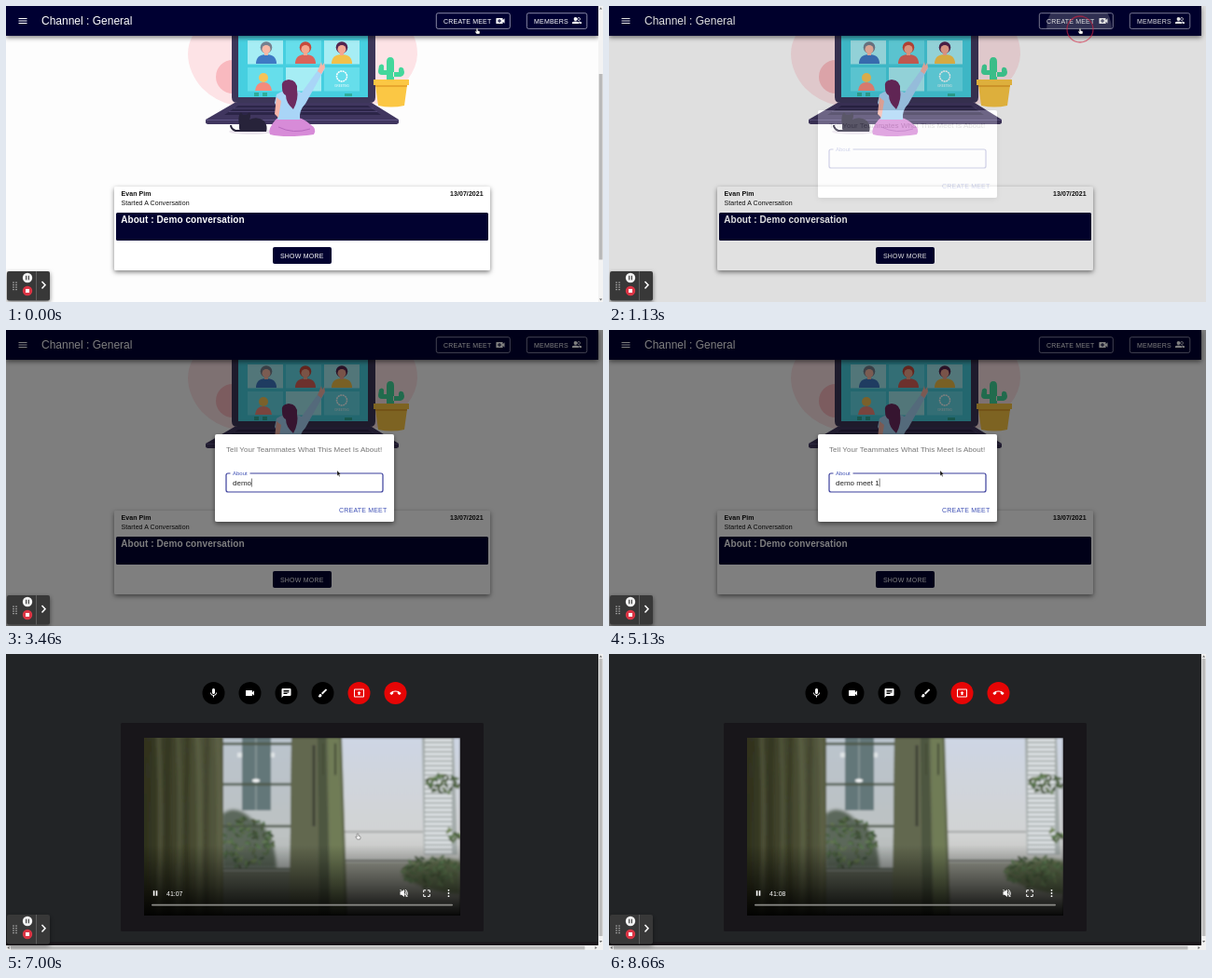
An HTML page that plays this animation: 640 by 318 pixels, repeating every 8.73 s.

```html
<!DOCTYPE html>
<html lang="en">
<head>
<meta charset="utf-8">
<title>Channel meet</title>
<style>
  html, body { margin: 0; width: 100%; height: 100%; overflow: hidden; background: #fdfdfd; }
  svg { display: block; width: 100%; height: 100%; }
  text { font: 7px "Liberation Sans", Arial, sans-serif; white-space: pre; }
  .button { letter-spacing: .2px; }
  .body { letter-spacing: .07px; fill: #111; }
  .bold { font-weight: bold; }
</style>
</head>
<body>
<svg viewBox="0 0 640 318">
  <defs>
    <filter id="shadow" x="-10%" y="-20%" width="120%" height="150%">
      <feDropShadow dx="0" dy="2" stdDeviation="2.5" flood-opacity=".5"/>
    </filter>
    <filter id="soft"><feGaussianBlur stdDeviation=".8"/></filter>
    <filter id="softer"><feGaussianBlur stdDeviation="1.6"/></filter>
    <linearGradient id="fade" x2="0" y2="1">
      <stop offset="0" stop-opacity="0"/><stop offset=".55" stop-opacity=".5"/><stop offset="1" stop-opacity=".95"/>
    </linearGradient>
    <linearGradient id="wall" x2="0" y2="1">
      <stop offset="0" stop-color="#ced6e4"/><stop offset=".55" stop-color="#d2d3d3"/><stop offset="1" stop-color="#a5a79d"/>
    </linearGradient>
    <linearGradient id="curtain" x2="1" y2="0">
      <stop offset="0" stop-color="#30321f"/><stop offset=".6" stop-color="#474b32"/><stop offset="1" stop-color="#565a41"/>
    </linearGradient>
    <clipPath id="videoClip"><rect x="148" y="90" width="339" height="191"/></clipPath>
    <clipPath id="meetClip"><rect x="461" y="7.5" width="79.5" height="17" rx="2"/></clipPath>
    <clipPath id="confirmClip"><rect x="353" y="184" width="59" height="18" rx="2"/></clipPath>
  </defs>

  <g id="channel">
    <rect width="640" height="318" fill="#fdfdfd"/>
    <g id="art">
      <path d="M200 32C190 50 196 72 210 88Q225 103 245 107L400 105Q440 80 441 52Q441 40 437 32Z" fill="#fde3e6"/>
      <circle cx="243" cy="76" r="18" fill="#f9b9bf"/>
      <path d="M242 32H396V98Q396 104 390 104H248Q242 104 242 98Z" fill="#3d3659"/>
      <path d="M249 32H388V98H249Z" fill="#46cfe0"/>
      <g id="tiles"/>
      <path d="M266 93h5v4h-5zm9 0h5v4h-5zm88 1h8v3h-8z" fill="#2fae9b"/>
      <path d="M245 104H392L421 122V125Q421 127 417 127H218Q214 127 214 125V122Z" fill="#40365f"/>
      <path d="M249 107H388L402 117H234Z" fill="#2c2548"/>
      <path d="M244 110H394M239 113.500H398" stroke="#5b5080" stroke-width=".7"/>
      <path d="M214 122.500H421" stroke="#5d5382"/>
      <ellipse cx="263" cy="135" rx="24" ry="3" fill="#ece6ee"/>
      <path d="M250 128q-2-10 2-14l2 3 4 0 3-3q2 4 0 8q8-4 15 1q5 5 3 12h-20q-8 0-9-3z" fill="#27233a"/>
      <path d="M262 134h-16q-5-2-5-6" fill="none" stroke="#27233a" stroke-width="2"/>
      <path d="M290 121Q280 132 283 138Q300 142 330 138Q334 132 326 127Q318 120 310 119Z" fill="#d78bd8"/>
      <path d="M292 130Q308 138 326 132" fill="none" stroke="#b869bf"/>
      <path d="M290 95Q304 86 317 93L338 64L342 67L321 105Q314 112 315 122H291Q293 112 288 104Z" fill="#a9d5f7"/>
      <path d="M334 70L338 60l1 4 2-3 1 5-4 7z" fill="#f7b5a8"/>
      <path d="M290 98l5 4-3 18-4-4z" fill="#f7b5a8"/>
      <path d="M296 88Q294 80 303 79Q313 80 312 90Q314 100 308 111Q300 104 300 96Q296 94 296 88Z" fill="#6d2a60"/>
      <path d="M408 80V60Q408 55 412 55Q416 55 416 60V80ZM400 64q3-3 5 0v5h6v5h-8q-4 0-4-4zM426 67q-4-3-5 1v3h-6v5h8q4-1 4-5z" fill="#43d79b"/>
      <path d="M394 79H432V85H430L427 107Q413 110 399 107L396 85H394Z" fill="#fbc744"/>
      <path d="M396 85H430l-.4 2H396.400Z" fill="#e8a72e"/>
    </g>

    <rect x="116" y="194" width="403" height="90" rx="2" fill="#fff" filter="url(#shadow)"/>
    <text class="body bold" x="123.500" y="204">Evan Pim</text>
    <text class="body bold" x="476" y="204">13/07/2021</text>
    <text class="body" x="123.500" y="214">Started A Conversation</text>
    <rect x="118" y="222" width="399" height="30" rx="1.500" fill="#020230"/>
    <text class="bold" x="123.200" y="233.300" fill="#fff" style="font-size:10px;letter-spacing:.075px">About : Demo conversation</text>
    <rect x="286" y="259" width="63" height="18" rx="2" fill="#020230"/>
    <text class="button" x="294" y="270.700" fill="#fff">SHOW MORE</text>

    <rect width="635" height="32" fill="#020230" filter="url(#shadow)"/>
    <g fill="#fff">
      <path d="M13.500 13h9v1h-9zm0 2.500h9v1h-9zm0 2.500h9v1h-9z"/>
      <text x="38" y="20.200" style="font-size:12px">Channel : General</text>
      <g fill="none" stroke="#a9a9bf" stroke-width=".8">
        <rect x="461.300" y="7.700" width="79" height="16.700" rx="2"/>
        <rect x="558.300" y="7.700" width="64.500" height="16.700" rx="2"/>
      </g>
      <circle id="meetRipple" cx="504" cy="25" clip-path="url(#meetClip)"/>
      <text class="button" x="469" y="18.500">CREATE MEET</text>
      <text class="button" x="566" y="18.500">MEMBERS</text>
      <path fill-rule="evenodd" d="M526 13h6q.6 0 .6.6v1.600l1.900-1.900v5.400l-1.900-1.900v1.600q0 .6-.6.6h-6q-.6 0-.6-.6v-4.800q0-.6.6-.6zm2.500 1v1.500h-1.500v1h1.500v1.500h1v-1.500h1.500v-1h-1.500v-1.500z"/>
      <circle cx="610.500" cy="14" r="1.900"/><circle cx="614" cy="14" r="1.500" fill="none" stroke="#fff" stroke-width=".7"/>
      <path d="M607 19v-1q0-1.500 3.500-1.500t3.500 1.500v1zm7.500 0v-1l-.7-1.500q3.200 0 3.200 1.500v1z"/>
    </g>

    <g id="pageScroll">
      <rect x="635" width="5" height="318" fill="#f3f3f3"/>
      <rect x="635.700" y="73" width="3.800" height="199.500" fill="#b9b9b9"/>
      <path d="M636 3.500l1.600-2 1.600 2zM636 314.500l1.600 2 1.600-2z" fill="#666"/>
    </g>

    <g id="dialog">
      <rect width="640" height="318" opacity=".5"/>
      <rect x="224" y="112" width="192" height="94" rx="2" fill="#fff" filter="url(#shadow)"/>
      <text x="236" y="130.600" fill="#767676" style="font-size:8px;letter-spacing:.05px">Tell Your Teammates What This Meet Is About!</text>
      <rect id="field" x="236" y="154" width="168" height="20" rx="2" fill="none"/>
      <rect x="240.500" y="152" width="21" height="4" fill="#fff"/>
      <text id="label" x="243" y="156.200" style="font-size:6px">About</text>
      <text id="typed" x="243" y="166.800" fill="#222" style="font-size:8px"></text>
      <path id="caret" d="M0 159.500v9" stroke="#222" stroke-width=".6"/>
      <g fill="#3f51b5">
        <rect id="hover" x="353" y="184" width="59" height="18" rx="2" opacity=".06"/>
        <circle id="confirmRipple" cx="377" cy="195" clip-path="url(#confirmClip)"/>
        <text class="button" x="357" y="195.600">CREATE MEET</text>
      </g>
    </g>
  </g>

  <g id="call">
    <rect width="640" height="318" fill="#222426"/>
    <rect x="123" y="74" width="389" height="224" rx="1.500" fill="#18161a"/>
    <g clip-path="url(#videoClip)">
      <g filter="url(#soft)">
        <rect x="148" y="90" width="339" height="191" fill="url(#wall)"/>
        <path d="M232 90H307V281H232Z" fill="#8d9a98" opacity=".3"/>
        <path d="M248 106h40v5h-40z" fill="#dfe4e6"/>
        <path d="M253 90h31v78h-31z" fill="#647779"/>
        <path d="M268 90v78M253 140h31" stroke="#8b9a9a" stroke-width="1.500"/>
        <ellipse cx="268" cy="136" rx="4" ry="1.700" fill="#fff"/>
        <path d="M360 191H447" stroke="#777b78"/>
        <path d="M360 222H447" stroke="#6d7068" stroke-width="2"/>
        <path d="M360 224H487V281H360Z" fill="#9b9d92"/>
        <path d="M232 233H307V281H232Z" fill="#62685a"/>
        <path d="M446 90h34l4 126h-36z" fill="#a4acab"/>
        <g id="slats"/>
        <path d="M232 172Q246 160 264 178Q288 186 290 230H232Z" fill="#4b5848" opacity=".85" filter="url(#softer)"/>
        <path d="M424 238Q448 212 487 222V258Q450 256 424 238Z" fill="#55683c" opacity=".75" filter="url(#softer)"/>
        <g id="plants"/>
        <path d="M232 96.500h75M232 140h75M232 185h75M232 231h75" stroke="#4c5646" stroke-width="2.500"/>
        <path d="M306 90H360L366 281H304Z" fill="#646c50"/>
        <path d="M306 90h28l2 191h-32z" fill="#62674f"/>
        <path d="M334 90h9l4 191h-11z" fill="#4d5640"/>
        <path d="M345 90h12l6 191h-15z" fill="#6f7c56"/>
        <path d="M330 98v87" stroke="#3b3d30" stroke-width="2.500"/>
        <path d="M340 96v34M353 96v34" stroke="#454d38" stroke-width="2"/>
        <rect x="146" y="88" width="87" height="195" fill="url(#curtain)"/>
        <g id="folds" filter="url(#softer)"/>
      </g>
      <rect x="148" y="205" width="339" height="76" fill="url(#fade)"/>
    </g>
    <g fill="#fff">
      <path d="M157.800 254.300h1.600v5.400h-1.600zm2.900 0h1.600v5.400h-1.600z"/>
      <text id="clock" x="172" y="259.500"></text>
      <path d="M422.500 255.300h1.800l2.600-2.400v8.200l-2.600-2.400h-1.800z"/>
      <path d="M428 254.800q2 2.200 0 4.400M428.200 253q4 4 .6 8M422.500 253l8 8" fill="none" stroke="#fff" stroke-width=".9"/>
      <path d="M447.700 256.200v-2.400h2.400m1.800 0h2.400v2.400m0 1.800v2.400h-2.400m-1.800 0h-2.400v-2.400" fill="none" stroke="#fff"/>
      <circle cx="474.500" cy="253.800" r=".9"/><circle cx="474.500" cy="257" r=".9"/><circle cx="474.500" cy="260.200" r=".9"/>
      <rect x="156" y="268.700" width="323" height="1.800" rx=".9" fill="#8c8c88"/>
    </g>
    <g id="actions"/>
    <rect y="309.500" width="635" height="3.500" fill="#1b161b"/>
    <path d="M635 0h5v318H0v-5h635z" fill="#f1f1f1"/>
    <path d="M635.700 5h3.800v298h-3.800zM5 313.800h615.500v3.600H5z" fill="#bcbcbc"/>
    <path d="M636 3.500l1.600-2 1.600 2zM636 308l1.600 2 1.600-2zM3.500 314l-2 1.600 2 1.600zM631.500 314l2 1.600-2 1.600z" fill="#666"/>
  </g>

  <g id="recorder">
    <rect x="1" y="285" width="46" height="31.500" rx="2" fill="#373737" filter="url(#shadow)"/>
    <path d="M32.500 285V316.500" stroke="#777" stroke-width=".6"/>
    <path d="M8 296.500v9M11 296.500v9" stroke="#ccc" stroke-width="1.200" stroke-dasharray="1.200 1.300"/>
    <circle cx="23" cy="292" r="5.200" fill="#f2f2f2"/>
    <path d="M21.700 289.800v4.400M24.300 289.800v4.400" stroke="#333" stroke-width="1.100"/>
    <circle cx="23" cy="306" r="5.200" fill="#dc3545"/>
    <rect x="21" y="304" width="4" height="4" fill="#fff"/>
    <path d="M38.500 296l3.500 3.700-3.500 3.700" fill="none" stroke="#fff" stroke-width="1.500"/>
  </g>

  <circle id="click" fill="none" stroke="#d3213f" stroke-width="1.300"/>
  <g id="cursor" stroke-width=".5">
    <path id="hand" d="M-1-3q0-1 1-1t1 1v2.300l2 .6q1 .3.8 1.400l-.5 2.500h-4l-2-3q.2-1 1.200-.5l.5.500z" fill="#fff" stroke="#222" transform="scale(.8)"/>
    <path id="arrow" d="M0 0v5.500l1.300-1.100.9 2 .8-.4-.9-1.900h1.700z" fill="#111" stroke="#ddd" stroke-width=".3"/>
  </g>
</svg>

<script>
const LOOP = 8730, MESSAGE = 'demo meet 1';
const TYPE_START = 3060, TYPE_STEP = 125, TYPE_END = 4600, BLUR = 6330, CALL_START = 6860;

const el = id => document.getElementById(id);
const set = (id, attrs) => { for (const k in attrs) el(id).setAttribute(k, attrs[k]); };
const show = (id, on) => { el(id).style.display = on ? '' : 'none'; };
const progress = (t, from, to) => Math.min(1, Math.max(0, (t - from) / (to - from)));
const ease = x => x * x * (3 - 2 * x);
const repeat = (n, draw) => Array.from({ length: n }, (_, i) => draw(i)).join('');

let seed = 7;
const random = () => (seed = seed * 16807 % 2147483647) / 2147483647;

function person(x, skin, hair, shirt) {
  return `<path d="M${x - 11} 62q0-10 11-10t11 10z" fill="${shirt}"/>
    <circle cx="${x}" cy="44.500" r="6.300" fill="${hair}"/><path d="M${x - 2} 48h4v5h-4z" fill="${skin}"/>
    <circle cx="${x}" cy="46.500" r="4.500" fill="${skin}"/>`;
}

el('tiles').innerHTML =
  repeat(6, i => `<rect x="${259 + i % 3 * 41}" y="${i < 3 ? 37 : 66}" width="38" height="25.500" fill="${i % 2 ? '#66deeb' : '#a6edf4'}"/>`) +
  person(279, '#f8b9a6', '#75808f', '#3f79c4') +
  person(321, '#f5a78d', '#c74a3c', '#d9635a') +
  person(360, '#f3a793', '#54244f', '#f2c14b') +
  `<path d="M267 91q1-9 9-9t9 9z" fill="#f48b7c"/><circle cx="276" cy="77" r="5" fill="#f6c356"/>
   <circle cx="360" cy="75.500" r="5.500" fill="none" stroke="#fff" stroke-width="1.500" stroke-dasharray="2 .6"/>
   <text x="360" y="86.500" text-anchor="middle" fill="#fff" style="font-size:3px">GREETING</text>`;

function leaves(cx, cy, rx, ry, count, light) {
  return repeat(count, () => {
    const angle = random() * 2 * Math.PI, d = Math.sqrt(random());
    const x = cx + rx * d * Math.cos(angle), y = cy + ry * d * Math.sin(angle);
    return `<ellipse cx="${x}" cy="${y}" rx="3" ry="1.300" fill="hsl(${85 + random() * 25} 20% ${light - 8 + random() * 18}%)" transform="rotate(${random() * 180} ${x} ${y})"/>`;
  });
}
el('plants').innerHTML = leaves(258, 203, 29, 27, 110, 31) + leaves(468, 140, 19, 10, 45, 33) +
  leaves(456, 234, 32, 17, 100, 37) + leaves(480, 195, 8, 9, 18, 36);
el('slats').innerHTML = repeat(25, i => `<path d="M449 ${91 + i * 5}h29v3.200h-29z" fill="#dde1e3"/>`);
el('folds').innerHTML = repeat(8, i =>
  `<path d="M${153 + i * 10.5} 88q${i % 2 ? 4 : -3} 90 ${i % 3 - 1} 195" fill="none" stroke="${i % 2 ? '#6a6e4e' : '#2a2c1c'}" stroke-width="${3 + i % 3}" opacity=".5"/>`);

const icons = [
  'M12 14c1.700 0 3-1.300 3-3V5c0-1.700-1.300-3-3-3S9 3.300 9 5v6c0 1.700 1.300 3 3 3zm5.300-3c0 3-2.500 5.100-5.300 5.100S6.700 14 6.700 11H5c0 3.400 2.700 6.200 6 6.700V21h2v-3.300c3.300-.5 6-3.300 6-6.700z',
  'M17 10.500V7q0-1-1-1H4Q3 6 3 7v10q0 1 1 1h12q1 0 1-1v-3.500l4 4v-11z',
  'M20 2H4Q2 2 2 4v18l4-4h14q2 0 2-2V4q0-2-2-2zM6 9h12v2H6zm8 5H6v-2h8zm4-6H6V6h12z',
  'M7 14c-1.700 0-3 1.300-3 3 0 1.300-1.200 2-2 2 .9 1.200 2.500 2 4 2 2.200 0 4-1.800 4-4 0-1.700-1.300-3-3-3zM20.700 4.600l-1.300-1.300q-.7-.6-1.400 0L9 12.200 11.800 15l8.900-9q.6-.7 0-1.400z',
  'M21 3H3Q1 3 1 5v14q0 2 2 2h18q2 0 2-2V5q0-2-2-2zm0 16H3V5h18zM10 12H8l4-4 4 4h-2v4h-4z',
  'M12 9q-2.400 0-4.600.7v3.100q0 .6-.6.9-1.400.7-2.600 1.900-.7.500-1.400 0L.3 13.100q-.6-.7 0-1.400Q5 7 12 7t11.700 4.700q.6.700 0 1.400l-2.500 2.500q-.7.500-1.400 0-1.200-1.200-2.600-1.900-.6-.3-.6-.9V9.700Q14.400 9 12 9z'
];
el('actions').innerHTML = icons.map((d, i) =>
  `<g transform="translate(${222.5 + i * 39} 42)"><circle r="12" fill="${i < 4 ? '#000' : '#e60505'}"/>
   <path d="${d}" fill="#fff" fill-rule="evenodd" transform="scale(.5) translate(-12 -12)"/></g>`).join('');

function ripple(id, t, start, size, strength) {
  const grow = progress(t, start, start + 280);
  set(id, { r: size * grow, opacity: strength * (1 - progress(t, start + 300, start + 600)) });
}

function clickRing(t, from, grow, x, y) {
  if (t < from || t > grow + 350) return false;
  set('click', { cx: x, cy: y, r: 4 + 10 * progress(t, grow, grow + 230), opacity: 1 - progress(t, grow + 270, grow + 350) });
  return true;
}

function caretVisible(t) {
  if (t >= BLUR) return false;
  if (t >= TYPE_START && t < TYPE_END) return true;
  return Math.floor(t < TYPE_START ? (t - 1130) / 535 : (t - TYPE_END) / 530) % 2 === 1;
}

function draw(t) {
  const inCall = t >= CALL_START;
  show('channel', !inCall);
  show('call', inCall);
  set('recorder', { transform: `translate(0 ${inCall ? -5 : 0})` });

  show('pageScroll', t < 1060);
  ripple('meetRipple', t, 800, 35, .24);
  set('dialog', { opacity: ease(progress(t, 1060, 1285)) * (1 - ease(progress(t, 6660, 6855))) });

  const focused = t < BLUR;
  set('field', { stroke: focused ? '#3b3f9c' : '#c4c4c4', 'stroke-width': focused ? 1.2 : .6 });
  set('label', { fill: focused ? '#3f51b5' : '#757575' });
  const count = Math.max(0, Math.floor((t - TYPE_START) / TYPE_STEP) + 1);
  el('typed').textContent = MESSAGE.slice(0, count);
  show('caret', caretVisible(t));
  if (!inCall) set('caret', { transform: `translate(${243.4 + el('typed').getComputedTextLength()} 0)` });
  show('hover', t >= 5560);
  ripple('confirmRipple', t, 6600, 38, .2);

  el('clock').textContent = t < 7800 ? '41:07' : '41:08';

  const toField = ease(progress(t, 1670, 1930)), toConfirm = ease(progress(t, 5140, 5640));
  const x = 505 - 150 * toField + 22 * toConfirm, y = 27 + 124 * toField + 45 * toConfirm;
  const pointing = t < 1730 || t >= 5560;
  set('cursor', { transform: `translate(${x} ${y})` });
  show('cursor', t < 8000);
  show('hand', pointing);
  show('arrow', !pointing);
  show('click', clickRing(t, 800, 830, 505, 25) || clickRing(t, 6400, 6600, 377, 195));
}

const start = performance.now();
function tick() {
  draw((performance.now() - start) % LOOP);
  requestAnimationFrame(tick);
}
tick();
</script>
</body>
</html>
```
